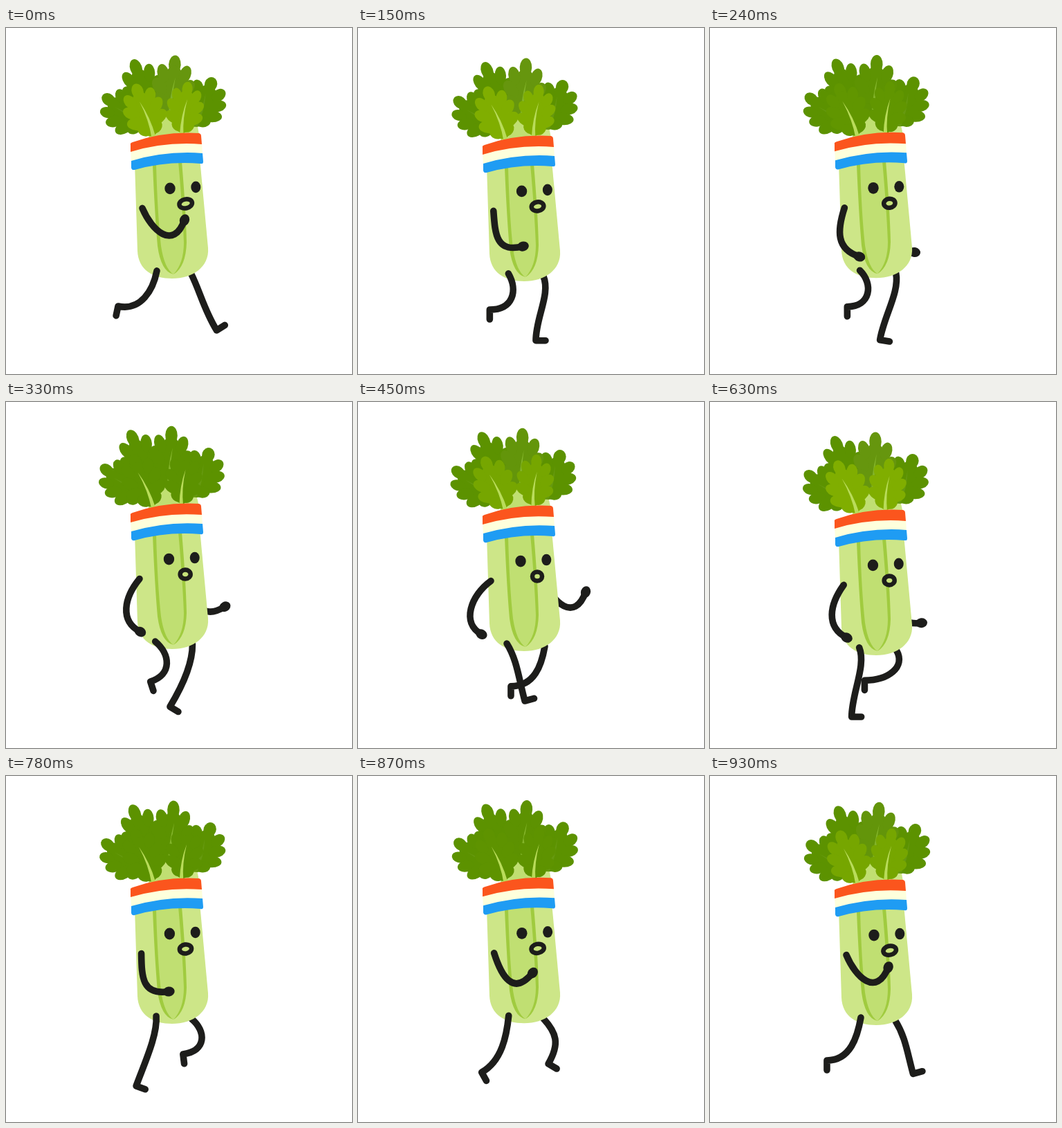
Animation of 500 by 500 pixels, one loop 0.96 s. Source, as an HTML page:

```html
<!DOCTYPE html>
<html lang="en">
<head>
<meta charset="utf-8">
<title>Running celery</title>
<style>
  html, body { margin: 0; width: 100%; height: 100%; overflow: hidden; background: #fff; }
  svg { display: block; width: 100vw; height: 100vh; }
  .limb { fill: none; stroke: #1d1d1b; stroke-width: 9.6; stroke-linecap: round; stroke-linejoin: round; }
  .ink { fill: #1d1d1b; }
</style>
</head>
<body>
<svg viewBox="0 0 500 500">
  <defs>
    <g id="lobes"></g>
    <path id="vein" d="M-2-54Q2-24-2.6 0H3.2Q5-28-2-54Z"/>
  </defs>
  <path id="farLeg" class="limb"/>
  <g id="farArm"><path class="limb"/><ellipse class="ink" rx="8.5" ry="7"/></g>
  <g id="torso">
    <g id="crown">
      <g id="back"></g>
      <path d="M204 168L208 148Q230 106 248 140L276 146L281 165Z" fill="#c0df72"/>
      <path d="M258 142L277 143L281 165H258Z" fill="#cde688"/>
      <g id="front"></g>
    </g>
    <path fill="#cde688" d="M186 195L190 322C191 350 213 362 240 362C270 362 294 345 292 318L280 188Z"/>
    <path fill="#c0df72" d="M214 195L251 190Q262 280 259 322Q256 348 242 356Q226 350 222 318Z"/>
    <path fill="#a0cb3f" d="M212 198H217Q219 270 224 315Q229 348 242 356Q224 352 219 315Q215 270 212 198Z
      M249 193H254Q260 265 261 310Q260 345 242 356Q257 340 257 310Q255 260 249 193Z"/>
    <path fill="#feffdc" d="M180 175Q232 160 283 166L284 184Q232 180 181 195Z"/>
    <path fill="#fb551d" d="M180 169Q179 166 183 165Q228 149 279 152Q282 153 282 156L283 168Q230 164 180 179Z"/>
    <path fill="#1f9cf3" d="M181 192Q232 177 284 181L285 193Q285 197 281 196Q232 192 186 205Q182 206 181 202Z"/>
    <g id="eyes" class="ink">
      <ellipse cx="237" cy="232" rx="7.7" ry="8.4"/>
      <ellipse cx="274.3" cy="230" rx="7" ry="8.3"/>
    </g>
    <ellipse id="mouth" ry="6.5" fill="#c6e27a" stroke="#1d1d1b" stroke-width="6.5"/>
  </g>
  <path id="nearLeg" class="limb"/>
  <g id="nearArm"><path class="limb"/><ellipse class="ink" rx="8.5" ry="7"/></g>
</svg>
<script>
const LOOP = 960, STEP = 30, RAD = Math.PI / 180;
const $ = id => document.getElementById(id);
const wave = (t, period = LOOP) => Math.cos(2 * Math.PI * t / period);

// Leaf outline: base at 0,0 and tip at 0,-80
const lobe = (x, y, rx, ry, a) =>
  `<ellipse rx="${rx}" ry="${ry}" transform="translate(${x} ${y}) rotate(${a})"/>`;
const pair = (x, y, rx, ry, a) => lobe(x, y, rx, ry, a) + lobe(-x, y, rx, ry, -a);
$('lobes').innerHTML = lobe(0, -69, 8, 11, 0) + lobe(0, -35, 16, 33, 0) +
  pair(14.5, -58, 7.5, 11, 20) + pair(18, -42, 8, 12, 45) +
  pair(15, -25, 9, 14, 68) + pair(8, -13, 8, 10, 50);

function leaf(parent, x, y, angle, sx, sy, vein) {
  $(parent).insertAdjacentHTML('beforeend',
    `<g fill="#5c9200" transform="translate(${x} ${y}) rotate(${angle}) scale(${sx} ${sy})">` +
    `<use href="#lobes"/><use href="#vein" fill="${vein}"/></g>`);
  return $(parent).lastElementChild;
}
leaf('back', 216, 135, -20, 1.08, 1.19, '#5c9200');
leaf('back', 200, 147, -50, 1.06, 0.98, '#66990f');
leaf('back', 272, 144, 21, 1.13, 0.97, '#66990f');
const topLeaf = leaf('back', 238, 137, 4, -1.1, 1.22, '#83b42a');
const frontLeaves = [
  leaf('front', 213, 158, -19, 1.06, 1.02, '#b9dc5a'),
  leaf('front', 254, 154, 7, -0.95, 0.96, '#b9dc5a')
];

// Stride shared by both legs: time, ankle x and y from the hip, foot angle, thigh angle
const stride = [
  [0, -56, 51, 102, -11],
  [150, -27, 56, 90, 30],
  [330, -7, 53, 72, 50],
  [450, 26, 81, -15, 32],
  [480, 37, 88, -32, 27],
  [630, -11, 104, 0, 22],
  [780, -29, 97, 20, 4],
  [930, -49, 60, 90, -10]
];

// Smooth periodic curve through the keys
function sample(keys, t) {
  t %= LOOP;
  const n = keys.length;
  const at = i => keys[(i + n) % n];
  const time = i => at(i)[0] + Math.floor(i / n) * LOOP;
  let i = n - 1;
  while (keys[i][0] > t) i--;
  const slope = (j, c) => (at(j + 1)[c] - at(j)[c]) / (time(j + 1) - time(j));
  const tangent = (j, c) => {
    const a = time(j) - time(j - 1), b = time(j + 1) - time(j);
    return (b * slope(j - 1, c) + a * slope(j, c)) / (a + b);
  };
  const h = time(i + 1) - time(i), u = (t - time(i)) / h, v = 1 - u;
  return at(i).slice(1).map((p, k) => {
    const c = k + 1;
    return v * v * (1 + 2 * u) * p + u * u * (3 - 2 * u) * at(i + 1)[c] +
      h * u * v * (v * tangent(i, c) - u * tangent(i + 1, c));
  });
}

// Thigh leaves the hip at its own angle; shin meets the foot at a right angle
function drawLeg(id, t, hipX, hipY, dy, reach, tuck) {
  const [ax, ay, footAngle, thighAngle] = sample(stride, t);
  const foot = footAngle * RAD, thigh = thighAngle * RAD;
  const lift = tuck * Math.max(0, wave(t - 150)) ** 8;
  const x = hipX + ax - lift, y = hipY + ay * reach - lift / 4;
  const c = Math.cos(foot), s = Math.sin(foot);
  $(id).setAttribute('d', `M${hipX} ${hipY + dy}` +
    `C${hipX + 28 * Math.sin(thigh)} ${hipY + dy + 28 * Math.cos(thigh)} ` +
    `${x + 34 * s} ${y - 34 * c} ${x} ${y}L${x + 14 * c} ${y + 14 * s}`);
}

// Hand swings like a pendulum and curls up at the front
function drawArm(id, t, x, y) {
  const swing = wave(t), curl = ((1 + swing) / 2) ** 3;
  const upper = (39 * swing - 16) * RAD, fore = (118 - 98 * curl) * RAD;
  const reach = 34 + 13 * curl;
  const hx = x + 23.5 + 40 * swing, hy = y + 77 - 60 * curl;
  const cx = hx - reach * Math.sin(fore), cy = hy + reach * Math.cos(fore);
  const sx = x + 2.5 * swing;
  const [path, hand] = $(id).children;
  path.setAttribute('d', `M${sx} ${y}C${sx + 35 * Math.sin(upper)} ` +
    `${y + 35 * Math.cos(upper)} ${cx} ${cy} ${hx} ${hy}`);
  hand.setAttribute('transform',
    `translate(${hx} ${hy}) rotate(${Math.atan2(hy - cy, hx - cx) / RAD})`);
}

const mix = (a, b, u) => `rgb(${a.map((p, i) => Math.round(p + (b[i] - p) * u))})`;
const DARK = [92, 146, 0], LIGHT = [128, 174, 0], OLIVE = [102, 150, 14];

function draw(t) {
  const half = LOOP / 2;
  const sway = wave(t);
  const dy = 4.8 * wave(t - 115, half) - 0.4;
  const tint = Math.min(1, Math.max(0, 0.6 + 0.9 * wave(t - 80, half)));

  $('torso').setAttribute('transform', `translate(0 ${dy})`);
  const k = (sway - 1) * 0.028;
  $('crown').setAttribute('transform', `matrix(1 0 ${-k} 1 ${165 * k} 0)`);
  $('eyes').setAttribute('transform', `translate(${sway - 1} 0)`);
  frontLeaves.forEach(l => l.setAttribute('fill', mix(DARK, LIGHT, tint)));
  topLeaf.setAttribute('fill', mix(DARK, OLIVE, tint));

  const wide = (1 + sway) / 2;
  $('mouth').setAttribute('rx', 7 + 2.4 * wide);
  $('mouth').setAttribute('transform',
    `translate(${259 + 0.7 * wide} 254) rotate(${-12 * wide})`);

  drawLeg('nearLeg', t, 216.5 + 1.5 * sway, 351, dy, 1, 0);
  drawLeg('farLeg', t + half, 268.7 - 1.3 * sway, 355, dy, 0.93, 19);
  drawArm('nearArm', t + 8, 194.5, 260.5 + dy);
  drawArm('farArm', t + half + 25, 265.5, 259.5 + dy);
}

const start = performance.now();
function tick() {
  const t = (performance.now() - start) % LOOP;
  draw(Math.floor(t / STEP) * STEP);
  requestAnimationFrame(tick);
}
tick();
</script>
</body>
</html>
```
